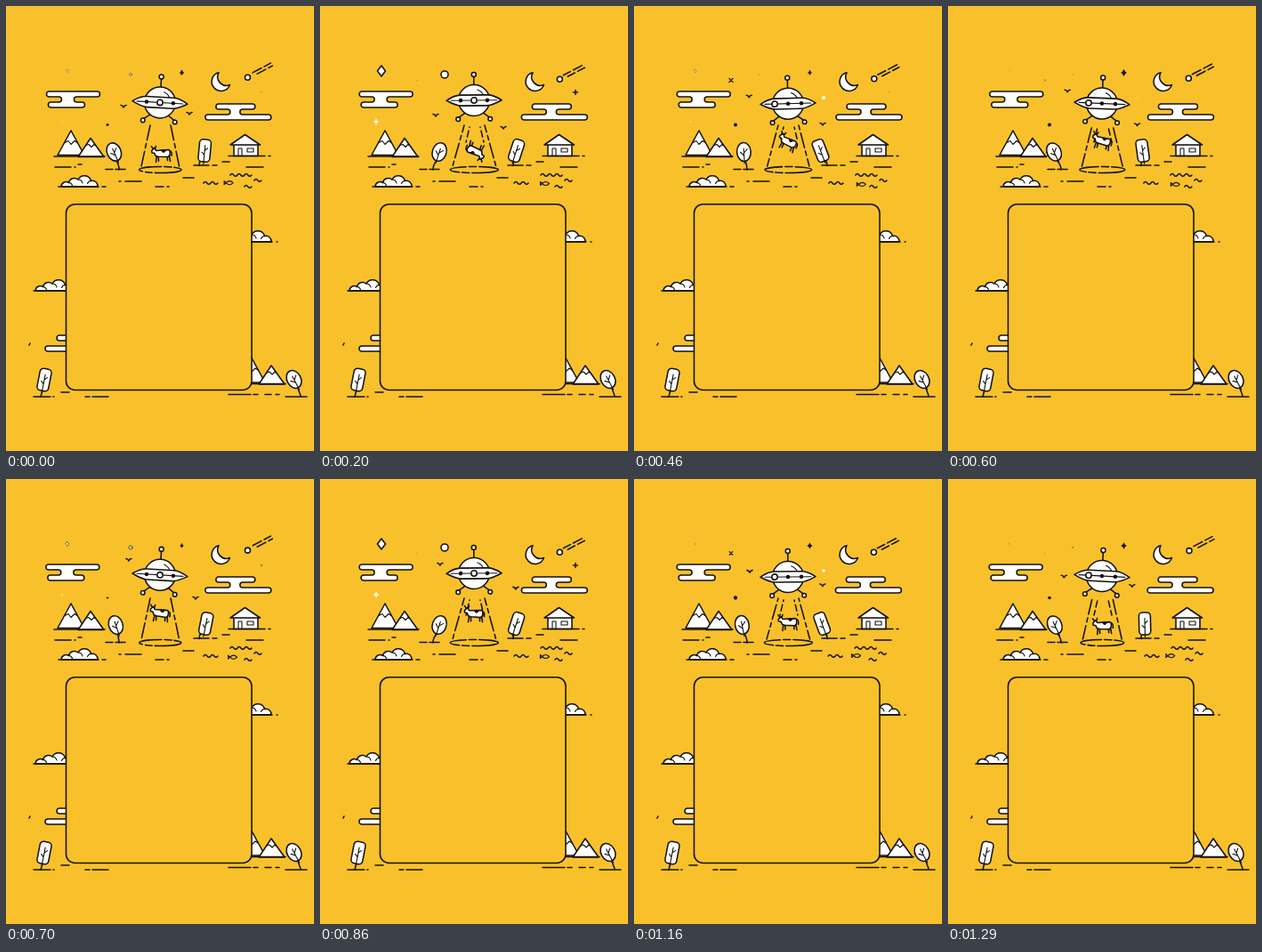
An HTML page for the animation above (1.33 s loop, 346x500 px).

```html
<!DOCTYPE html>
<html lang="en">
<head>
<meta charset="utf-8">
<title>Night visitor</title>
<style>
html, body { margin: 0; width: 100%; height: 100%; overflow: hidden; background: #f8c12b; }
svg { display: block; width: 100vw; height: 100vh; }
.ink { fill: none; stroke: #14110f; stroke-width: 1.55; stroke-linecap: round; stroke-linejoin: round; }
.w { fill: #fff; }
.y { fill: #f8c12b; }
.k { fill: #14110f; }
.thin { stroke-width: 1.1; }
</style>
</head>
<body>
<svg viewBox="0 0 346 500" preserveAspectRatio="none">
  <rect class="y" width="346" height="500"/>
  <g class="ink" id="scene"></g>
</svg>
<script>
const LOOP = 1330, HALF = LOOP / 2, QUARTER = LOOP / 4, STEP = LOOP / 40;
const scene = document.getElementById('scene');

const path = (d, c = '') => `<path class="${c}" d="${d}"/>`;
const ball = (x, y, r, c = 'w') => `<circle class="${c}" cx="${x}" cy="${y}" r="${r}"/>`;
const at = (x, y, body) => `<g transform="translate(${x} ${y})">${body}</g>`;
const group = (id, body = '') => `<g id="${id}">${body}</g>`;
const dash = (y, ...xs) => {
  let d = '';
  for (let i = 0; i < xs.length; i += 2) d += `M${xs[i]} ${y}H${xs[i + 1]}`;
  return path(d);
};

// Two stacked pills joined by a waisted neck
function pills(a, b, c, d, n, m) {
  return path(`M${a + 3} 0H${b - 3}a3 3 0 0 1 0 6H${m}a3 3 0 0 0 0 6H${d - 3}a3 3 0 0 1 0 6H${c + 3}` +
    `a3 3 0 0 1 0-6H${n}a3 3 0 0 0 0-6H${a + 3}a3 3 0 0 1 0-6Z`, 'w');
}

const puff = path('M0 0A5.500 5.500 0 0 1 8.500-4.500A6.500 6.500 0 0 1 19-8A7.800 7.800 0 0 1 33.500-6.500' +
  'A6 6 0 0 1 41 0Z', 'w') + path('M8.500-4.500q3 0 4 3M19-8q4 0 5 4M33.500-6.500q-3 0-4 3', 'thin');

const mountains = path('M-15 0L0-27.500L15 0Z', 'w') + path('M-7-14l4-2 3 4 4-4 3 2', 'thin') +
  path('M8 2L22-19L37 2Z', 'w') + path('M17-11l3-1 3 3 3-3 1 1', 'thin') + dash(1.5, -19, 38);

const oval = '<ellipse class="w" rx="7.800" ry="10.500"/>' + path('M0 13V-4M0 4L-4 0M0 1L4-3', 'thin');
const block = '<rect class="w" x="-6.500" y="-12.500" width="13" height="25" rx="4"/>' +
  path('M0 15V-6M0 5L-3 2M0 0L3-3', 'thin');
const tree = (id, leaf) => `<path id="${id}Stem"/>` + group(id + 'Leaf', leaf);

const house = path('M256 155.500V168.500H283V155.500Z', 'w') + path('M252 156L268.500 144.500L285.500 156Z', 'w') +
  path('M261 168V160H265V168M271 160H278V164H271Z', 'thin') + dash(168.5, 250, 291, 295, 297);

const wave = (x, y, n) => path(`M${x} ${y}` + 'q2-3 4 0q2 2.500 4 0'.repeat(n));
const bird = path('M-3-1.500Q-1-1.500 0 1Q1-1.500 3-1.500');
const diamond = 'M0-6L4.500 0L0 6L-4.500 0Z';

const cow = path('M-6 2L-7 8M-4 2L-4 7M6 1L6 7M8 0L9 8M9-4Q12-3 11 2M-9-7L-11-10M-7-7L-6-10') +
  path('M-6-5L8-5Q10-4 9 1L7 3L-4 2L-7 1L-8-2L-11-3L-11-5L-8-8Z', 'w') +
  path('M0-5Q2 0 5-5Z', 'k thin');

const ship =
  path('M0-17V-25') + ball(0, -28, 2.5) +
  path('M-10 15L-17 20M10 15L17 20') + ball(-18, 22, 2.3) + ball(18, 22, 2.3) +
  ball(0, 1, 17.5) + path('M4-11Q9-9 11-4', 'thin') +
  path('M-31 1Q-22-5-15-5H15Q22-5 31 1Q20 7 14 7H-14Q-20 7-31 1Z', 'w') +
  path('M-26 1H26', 'thin') + group('ports');

scene.innerHTML =
  // lower landscape, partly hidden by the panel
  at(33, 320, puff) + dash(320, 31, 80) +
  at(257, 265, puff) + dash(265, 262, 299, 304, 305) +
  at(44, 370, pills(13, 60, 0, 50, 24, 40)) +
  at(276, 423, mountains) + dash(439, 31, 50, 53, 54, 89, 94, 97, 115, 314, 338) +
  dash(434, 62, 71) + dash(436.5, 250, 275, 278, 283, 291, 298, 303, 307) +
  path('M39 439L41 432M331 438L327 427') +
  `<g transform="translate(43 420) rotate(11)">${block}</g>` +
  `<g transform="translate(323.500 419.500) rotate(-28)">${oval}</g>` + path('M27 379l-1 2') +
  '<rect class="y" x="67.500" y="222.700" width="208.500" height="208.800" rx="10"/>' +
  // upper landscape
  at(73, 167.5, mountains) + at(62, 203, puff) + house +
  dash(181, 55, 73, 77, 78, 270, 289) + dash(178, 81, 85) + dash(183.5, 112, 120, 123, 134) +
  dash(197, 127, 129, 134, 152) + dash(203, 59, 104, 108, 112, 168, 177, 181, 183) +
  dash(179, 211, 228, 232, 237) + dash(175, 243, 251) + dash(193, 199, 211) +
  group('waves', wave(248, 190, 3) + wave(275, 196, 1) + wave(218, 199, 2) + wave(264, 203, 1)) +
  group('fish', path('M-4 0Q0-4 4 0Q0 4-4 0ZM-4 0L-6-2V2Z', 'thin')) +
  group('oval', tree('oval', oval)) + group('block', tree('block', block)) +
  // sky
  group('cloudL', pills(0, 60, 2, 43, 14, 34)) + group('cloudR', pills(12, 56, 0, 74, 25, 42)) +
  path('M239 74.800A10.500 10.500 0 1 0 251.500 88.500A9.800 9.800 0 0 1 239 74.800Z', 'w') +
  group('comet', ball(0, 0, 3) +
    '<path id="tail" stroke-dasharray="11 3.500" d="M4-4.500L26-16M9-3L28-13"/>') +
  group('gem', path(diamond, 'w')) + group('ring', ball(0, 0, 4)) +
  group('cross', path('M-2.500-2.500L2.500 2.500M2.500-2.500L-2.500 2.500')) +
  group('spark', path('M0-3Q.5-.5 2.500 0Q.5.5 0 3Q-.5.5-2.500 0Q-.5-.5 0-3Z', 'k thin')) +
  group('plus', path('M-2.500 0H2.500M0-2.500V2.500')) +
  '<g stroke="#fff">' + group('glintL', path('M-2.500 0H2.500M0-2.500V2.500')) +
  group('glintR', '<circle r="1.200" fill="#fff"/>') + '</g>' +
  group('bead', ball(0, 0, 1.4, 'k thin')) +
  group('birdL', bird) + group('birdR', bird) +
  // abduction
  '<path id="beam" stroke-dasharray="17 4 5 4"/><path id="inner" stroke-dasharray="7 4"/>' +
  '<ellipse id="pool" cx="173.300" cy="184" ry="3.500" stroke-dasharray="30 3 8 3"/>' +
  group('cow', cow) + group('ship', ship);

const $ = id => document.getElementById(id);
const set = (id, attrs) => { for (const k in attrs) $(id).setAttribute(k, attrs[k]); };
const place = (id, x, y, a = 0, s = 1) =>
  set(id, { transform: `translate(${x} ${y}) rotate(${a}) scale(${s})` });
const swing = (t, peak, period = HALF) => Math.cos(2 * Math.PI * (t - peak) / period);

const times = [0, 200, 460, 700, 860, 1030, 1290, LOOP];
function follow(t, v) {
  let i = 0;
  while (i < 6 && t >= times[i + 1]) i++;
  const p = (t - times[i]) / (times[i + 1] - times[i]);
  return v[i] + (v[i + 1] - v[i]) * p;
}

function twinkle(id, x, y, s) {
  place(id, x, y, 0, Math.max(0, s));
  $(id).style.display = s > 0.08 ? '' : 'none';
}

function sway(id, x, y, reach, height, drift, tilt) {
  const dx = reach * drift;
  place(id, x, y);
  set(id + 'Stem', { d: `M0 0Q0 -6 ${dx * 0.65} ${-height * 0.55}` });
  place(id + 'Leaf', dx, -height, tilt);
}

function draw(t) {
  const pulse = -swing(t, 20, QUARTER);

  place('cloudL', 46 - 2.2 * swing(t, 140), 96);
  place('cloudR', 226 - 2.2 * swing(t, 17), 110);
  place('comet', 270.4 - 1.1 * pulse, 81.2 + 1.1 * pulse);
  set('tail', { 'stroke-dashoffset': 2 * pulse });
  place('waves', -2 * pulse + 2, 0);
  const swim = swing(t, 530, LOOP);
  place('fish', 253.5 + 3 * swim, 199.5 + swim);

  sway('oval', 127, 184, 8, 20, swing(t, 250), 26 * swing(t, 285));
  sway('block', 217, 179.5, 8.5, 17, swing(t, 80), 21 * swing(t, 140));

  twinkle('gem', 69, 73, 0.55 + 0.48 * swing(t, 235));
  twinkle('ring', 140, 77, 0.5 + 0.5 * swing(t, 200));
  twinkle('cross', 109, 83.5, 0.35 + 0.55 * swing(t, 415));
  twinkle('spark', 197.5, 75, 0.5 + 0.55 * swing(t, 575));
  twinkle('plus', 287, 97, 0.45 + 0.55 * swing(t, 230));
  twinkle('glintL', 63, 130, 0.5 + 0.5 * swing(t, 240));
  twinkle('glintR', 213, 103, 0.2 + 0.9 * swing(t, 430));
  twinkle('bead', 114, 133.5, 0.55 + 0.6 * swing(t, 540));
  place('birdL', follow(t, [132, 130, 129, 138, 135, 130, 130, 132]),
    follow(t, [113, 123, 102, 91, 96, 99, 109, 113]));
  place('birdR', follow(t, [206, 206, 212, 213, 220, 217, 207, 206]),
    follow(t, [121, 137, 133, 134, 123, 119, 120, 121]));

  const rx = 25.3 + 1.8 * pulse, foot = rx * 0.9;
  set('pool', { rx });
  set('beam', {
    d: `M162 134L${173.3 - foot} 180M185 134L${173.3 + foot} 180`,
    'stroke-dashoffset': 30 * t / HALF
  });
  set('inner', { d: 'M168 136L164 153M180 136L184 153', 'stroke-dashoffset': 11 * t / QUARTER });
  $('inner').style.display = pulse > -0.6 ? '' : 'none';

  place('cow', follow(t, [175, 175, 172.5, 173, 173.5, 173, 174, 175]),
    follow(t, [167, 162, 154, 152, 152.5, 158, 166, 167]),
    follow(t, [356, 200, 22, 4, 0, -3, -4, -4]));

  place('ship', 173, 107 - 2 * swing(t, 190), 3.4 * swing(t, 17));
  const lit = [1, 2, 0][Math.floor(t % HALF / (HALF / 3))];
  $('ports').innerHTML = [0, 1, 2].map(i =>
    i === lit ? ball(15 * (i - 1), 1, 3.2) : ball(15 * (i - 1), 1, 1.5, 'k')).join('');
}

const start = performance.now();
function tick(now) {
  const t = Math.max(0, now - start) % LOOP;
  draw(Math.min(39, Math.floor((t + 7) / STEP)) * STEP);
  requestAnimationFrame(tick);
}
draw(0);
requestAnimationFrame(tick);
</script>
</body>
</html>
```
